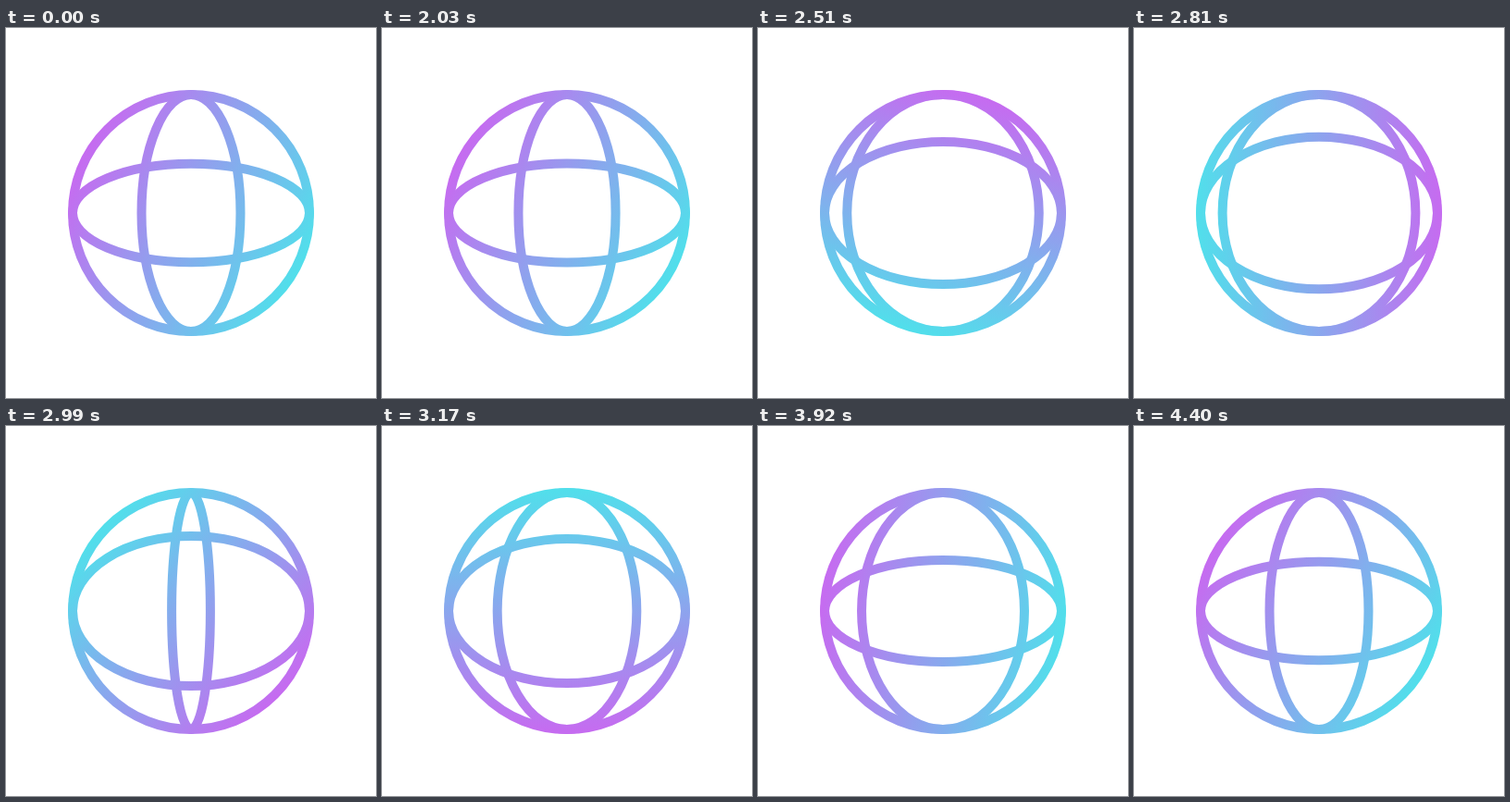
An HTML page that plays this animation: 400 px wide and 400 px high, repeating every 4.49 s.

```html
<!DOCTYPE html>
<html lang="en">
<head>
<meta charset="utf-8">
<title>Spinning globe</title>
<style>
  html, body { margin: 0; width: 100%; height: 100%; overflow: hidden; background: #fff; }
  svg { display: block; width: 100vw; height: 100vh; }
</style>
</head>
<body>
<svg viewBox="0 0 400 400">
  <defs>
    <linearGradient id="tint" gradientUnits="userSpaceOnUse" x1="330" y1="200" x2="70" y2="200">
      <stop offset="0" stop-color="#c56cf0"/>
      <stop offset="1" stop-color="#52deeb"/>
    </linearGradient>
  </defs>
  <g fill="none" stroke="url(#tint)" stroke-width="10">
    <circle cx="200" cy="200" r="128"/>
    <ellipse id="meridian" cx="200" cy="200" rx="53.5" ry="128"/>
    <ellipse id="equator" cx="200" cy="200" rx="128" ry="53.3"/>
  </g>
</svg>
<script>
const LOOP = 4490, START = 2000, SPIN = 2400, STEP = 30;
const RADIUS = 128, TILT = 24.7, HUE_ANGLE = 208;

// [progress, value] knots
const turn = [[0, 0], [.2125, .219], [.4125, .5425], [.575, .794], [.8, .948], [1, 1]];
const height = [[0, 53.3], [.2125, 77], [.3, 82], [.4125, 81], [.575, 73], [.8, 55], [1, 53.3]];

const [tint, meridian, equator] = ['tint', 'meridian', 'equator'].map(id => document.getElementById(id));

function slope(knots, i) {
  if (i === 0 || i === knots.length - 1) return 0;
  const [a, b] = [knots[i - 1], knots[i + 1]];
  return (b[1] - a[1]) / (b[0] - a[0]);
}

// Smooth curve through the knots, at rest at both ends
function sample(knots, x) {
  let i = 0;
  while (i < knots.length - 2 && x > knots[i + 1][0]) i++;
  const [x0, y0] = knots[i], [x1, y1] = knots[i + 1];
  const w = x1 - x0, u = (x - x0) / w, v = 1 - u;
  return y0 * v * v * (1 + 2 * u) + y1 * u * u * (1 + 2 * v)
    + w * u * v * (v * slope(knots, i) - u * slope(knots, i + 1));
}

function draw(now) {
  const steps = Math.floor((now % LOOP - START) / STEP);
  const x = Math.min(1, Math.max(0, steps * STEP / SPIN));
  const angle = 360 * sample(turn, x);
  const rx = RADIUS * Math.abs(Math.sin((TILT - angle) * Math.PI / 180));
  meridian.setAttribute('rx', Math.max(rx, .01));
  equator.setAttribute('ry', sample(height, x));
  tint.setAttribute('gradientTransform', `rotate(${HUE_ANGLE + angle} 200 200)`);
}

const begin = performance.now();
function tick() {
  draw(performance.now() - begin);
  requestAnimationFrame(tick);
}
tick();
</script>
</body>
</html>
```
